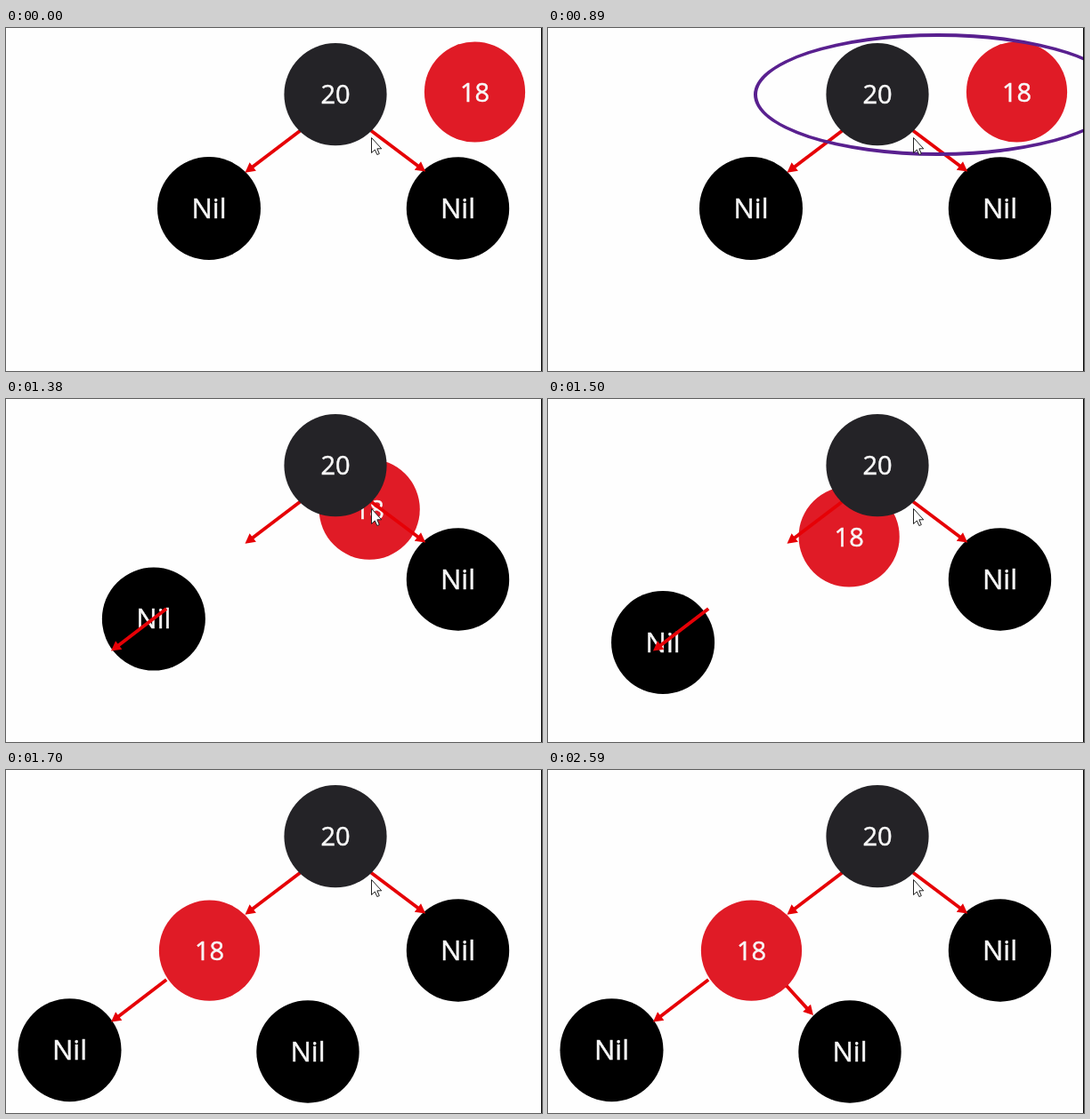
Write an HTML page that moves like this. It is 602x386 px and loops after 3040 ms.

```html
<!DOCTYPE html>
<html lang="en">
<head>
<meta charset="utf-8">
<title>Tree insertion</title>
<style>
  html, body { margin: 0; width: 100%; height: 100%; overflow: hidden; background: #fefefe; }
  #stage { position: relative; width: 100%; height: 100%; overflow: hidden; contain: strict; }
  svg { position: absolute; left: 0; top: 0; width: 100%; height: 100%; }
  text {
    font-family: "Open Sans", "Noto Sans", sans-serif; text-anchor: middle;
    fill: #f8f8f8; stroke: #f8f8f8; stroke-width: .5px;
  }
  /* Half of the ring lies past the right edge, so it gets its own clip */
  #clip { position: absolute; inset: 0; overflow: hidden; contain: strict; }
  #ring {
    position: absolute; left: 231px; top: 6px; width: 414px; height: 138px;
    box-sizing: border-box; border: 4px solid #59208f; border-radius: 50%;
  }
</style>
</head>
<body>
<div id="stage">
  <svg id="tree" viewBox="0 0 602 386"></svg>
  <div id="clip"><div id="ring"></div></div>
  <svg viewBox="0 0 602 386">
    <path d="M410.5 123.5V140.5L414.3 137L416.8 142.5L419.3 141.5L416.9 135.8H421.8Z" fill="#fff" stroke="#222" stroke-width="1"/>
    <rect x="601" width="1" height="386" fill="#000"/>
  </svg>
</div>
<script>
const LOOP = 3040;
const tree = document.getElementById('tree');
const ring = document.getElementById('ring');

function add(parent, tag, attrs, text) {
  const el = document.createElementNS('http://www.w3.org/2000/svg', tag);
  for (const k in attrs) el.setAttribute(k, attrs[k]);
  if (text) el.textContent = text;
  return parent.appendChild(el);
}

function node(label, x, y, r, fill, size) {
  const g = add(tree, 'g', {});
  add(g, 'circle', { r, fill });
  add(g, 'text', { y: 10.7, 'font-size': size }, label);
  place(g, x, y);
  return g;
}

function place(g, x, y) {
  g.setAttribute('transform', `translate(${x} ${y})`);
}

function arrow(x1, y1, x2, y2) {
  const len = Math.hypot(x2 - x1, y2 - y1);
  const deg = Math.atan2(y2 - y1, x2 - x1) * 180 / Math.PI;
  const g = add(tree, 'g', {});
  add(g, 'path', {
    d: `M0 -1.9H${len - 11}V-6L${len} 0L${len - 11} 6V1.9H0Z`,
    fill: '#e60006',
    transform: `translate(${x1} ${y1}) rotate(${deg})`
  });
  return g;
}

const clamp = v => Math.max(0, Math.min(1, v));
const mix = (a, b, p) => a + (b - a) * p;
const show = (el, on) => { el.style.visibility = on ? 'visible' : 'hidden'; };

const leftNil = node('Nil', 228, 203, 58, '#000', 31);
node('Nil', 507.5, 203, 57.7, '#000', 31);
const newNil = node('Nil', 339, 317, 57.7, '#000', 31);
const red = node('18', 526.5, 72, 56.6, '#e01b26', 29);
arrow(330.5, 115.6, 268.5, 162.7);
arrow(410, 115.6, 471.2, 161.6);
const leftArrow = arrow(180.2, 236, 118, 283.6);
const rightArrow = arrow(268, 243, 298, 276);
node('20', 370, 74.7, 57.6, '#242327', 29);

// Slide progress: [time, value] pairs, linear between them
const slide = [[1180, 0], [1220, .046], [1380, .397], [1500, .632], [1580, .749], [1700, 1]];

function track(keys, t) {
  if (t <= keys[0][0]) return keys[0][1];
  for (let i = 1; i < keys.length; i++) {
    const [t0, a] = keys[i - 1], [t1, b] = keys[i];
    if (t < t1) return mix(a, b, (t - t0) / (t1 - t0));
  }
  return keys[keys.length - 1][1];
}

// Reveal from the top edge downwards
function wipe(el, p) {
  show(el, p > 0);
  el.style.opacity = Math.min(1, p * 3);
  el.style.clipPath = p < 1 ? `inset(0 0 ${(1 - p) * 100}% 0)` : 'none';
}

// Two-spoke clockwise reveal with a soft leading edge
function wheel(p) {
  const end = p * 180;
  const mask = p < 1
    ? `repeating-conic-gradient(#000 0deg ${Math.max(0, end - 8)}deg, transparent ${end}deg 180deg)`
    : 'none';
  ring.style.webkitMaskImage = mask;
  ring.style.maskImage = mask;
}

function draw(time) {
  // The picture advances in 40 ms steps
  const phase = time < 1050 ? 10 : 20;
  const t = Math.floor((time - phase) / 40) * 40 + phase;

  show(ring, t >= 450 && t < 1140);
  wheel(clamp((t - 410) / 400));

  const p = track(slide, t);
  place(red, mix(526.5, 228.5, p), mix(72, 203.2, p));
  place(leftNil, mix(228, 71.5, p), mix(203, 315.2, p));

  wipe(leftArrow, clamp((t - 1200) / 160));
  show(newNil, t >= 1700);
  wipe(rightArrow, clamp((t - 1700) / 240));
}

const start = performance.now();
function tick() {
  draw((performance.now() - start) % LOOP);
  requestAnimationFrame(tick);
}
tick();
</script>
</body>
</html>
```
